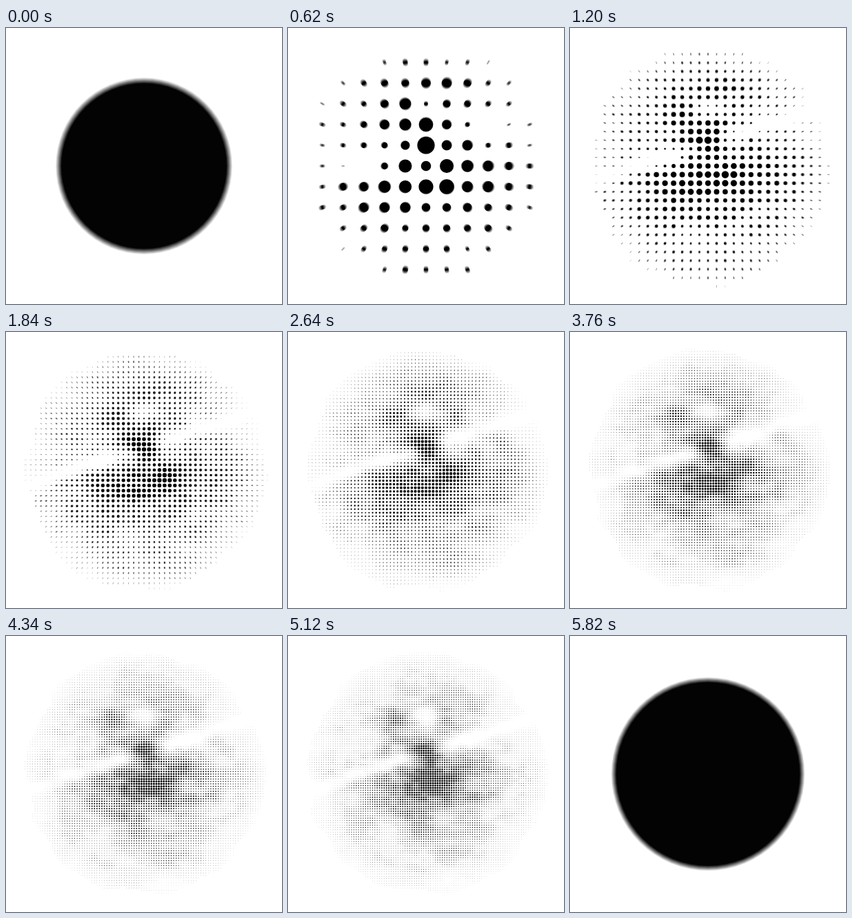
An HTML page with a canvas that plays this animation: 400x400 px, repeating every 5.84 s.

```html
<!DOCTYPE html>
<html lang="en">
<head>
<meta charset="utf-8">
<title>Halftone clouds</title>
<style>
html, body { margin: 0; height: 100%; overflow: hidden; background: #fff; }
canvas { display: block; }
</style>
</head>
<body>
<canvas id="stage" width="400" height="400"></canvas>
<script>
const ctx = document.getElementById('stage').getContext('2d');
const STEP = 20, STEPS = 292, MID = 200, EDGE = 174, SHUTTER = .7;

const mix = (a, b, k) => a + (b - a) * k;
const ease = k => k * k * (3 - 2 * k);
const bell = d => Math.exp(-d * d);
const puff = (x, y, rx, ry) => bell(x / rx) * bell(y / ry);

// Cells across the stage: slow start, steady growth, soft landing
const cells = s =>
  120.7 - .00175 * (291 - s) ** 2 + 28.49 * Math.exp(-s / 30);

function hash(x, y) {
  const v = Math.sin(x * 127.1 + y * 311.7) * 43758.5453;
  return v - Math.floor(v);
}

function noise(x, y) {
  const ix = Math.floor(x), iy = Math.floor(y);
  const u = ease(x - ix), v = ease(y - iy);
  return mix(mix(hash(ix, iy), hash(ix + 1, iy), u),
             mix(hash(ix, iy + 1), hash(ix + 1, iy + 1), u), v) - .5;
}

// Cloud texture: wide, flat octaves sliding in turn left and right
function texture(x, y, drift) {
  let sum = 0;
  for (let o = 0, size = 44; o < 3; o++, size /= 2) {
    const slide = o % 2 ? drift : -drift;
    sum += noise(x / size + slide, y / size * 1.6 + drift) * .3 * .8 ** o;
  }
  return sum;
}

// Darkness around the centre: a core, masses above and below,
// and a bright slanted rift between them
function shadeAt(x, y, s) {
  const drift = s / 150;
  const core = puff(x - 7 + 5 * drift, y + 36, 27, 20);
  const rift = bell((y + 32 + .32 * x) / 11);
  return .54 + texture(x, y, drift)
    + .5 * core
    + .38 * puff(x - 15, y - 20, 75, 38)
    + .35 * puff(x + 42, y + 80, 24, 28)
    + .25 * puff(x - 25, y + 108, 50, 18)
    - .35 * puff(x, y + 84, 20, 14)
    - .5 * rift * (1 - core);
}

// Dot radius as a share of the cell
function dotSize(x, y, s) {
  const r = Math.hypot(x, y);
  if (r > EDGE + 16 * noise(x / 28, y / 28 + s / 150)) return 0;
  const fade = Math.max(0, 1 - (r / 184) ** 2) ** .65;
  const size = .42 * Math.min(1, Math.max(0, shadeAt(x, y, s) * fade));
  return mix(size, .35 * fade, bell(s / 6));
}

function draw(s) {
  const pitch = 400 / cells(s + SHUTTER / 2);
  const reach = Math.ceil(EDGE / pitch), dots = [];
  for (let j = -reach; j <= reach; j++)
    for (let i = -reach; i <= reach; i++) {
      const size = dotSize(i * pitch, j * pitch, s);
      if (size > .025) dots.push([i, j, size]);
    }

  // Average several moments for motion blur
  const samples = Math.max(2, Math.round(pitch / 3));
  ctx.clearRect(0, 0, 400, 400);
  ctx.globalCompositeOperation = 'lighter';
  ctx.globalAlpha = 1 / Math.min(samples, 12);
  for (let n = 0, last = Math.min(samples, 12) - 1; n <= last; n++) {
    const p = 400 / cells(s + SHUTTER * n / last);
    ctx.beginPath();
    for (const [i, j, size] of dots) {
      const x = MID + i * p, y = MID + j * p, r = size * p;
      ctx.moveTo(x + r, y);
      ctx.arc(x, y, r, 0, 2 * Math.PI);
    }
    ctx.fill();
  }
}

let shown = -1;
function tick() {
  const s = (Math.floor(performance.now() / STEP) + 1) % STEPS;
  if (s !== shown) draw(shown = s);
  requestAnimationFrame(tick);
}
tick();
</script>
</body>
</html>
```
